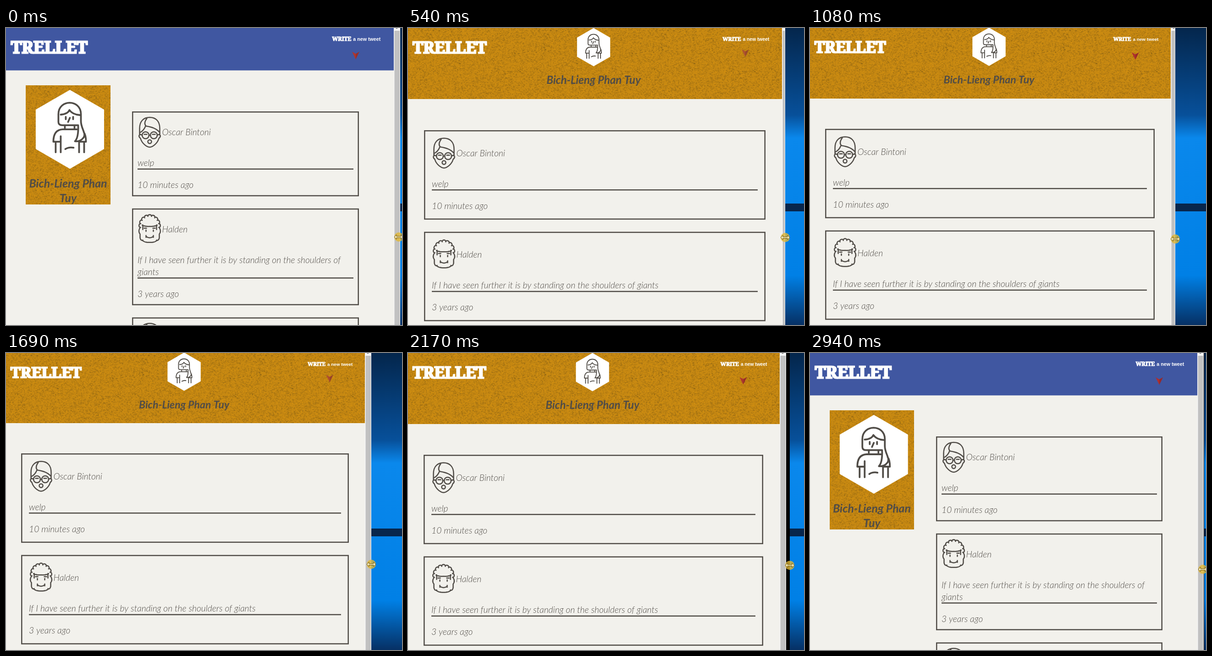
Animation, 864 px wide and 648 px high, one loop 3010 ms. Source, as an HTML page with a canvas:

```html
<!DOCTYPE html>
<html lang="en">
<head>
<meta charset="utf-8">
<title>Responsive feed</title>
<style>
  html, body { margin: 0; width: 100%; height: 100%; overflow: hidden; background: #f2f1ec; }
  canvas { display: block; }
</style>
</head>
<body>
<canvas id="stage" width="864" height="648"></canvas>
<script>
const LOOP = 3010;
const BREAKPOINT = 817;
const INK = '#504c47';
const PAPER = '#f2f1ec';
const BLUE = '#4057a1';
const TAU = Math.PI * 2;
const ctx = document.getElementById('stage').getContext('2d');

const clamp = p => Math.max(0, Math.min(1, p));
const smooth = p => p * p * (3 - 2 * p);

// The picture is refreshed in bursts, with a short rest after each
const TICKS = [0];
function burst(from, to, count) {
  for (let i = 0; i < count; i++) TICKS.push(Math.floor((from + (to - from) * i / (count - 1)) / 10) * 10);
}
burst(70, 540, 7);
burst(650, 1150, 8);
burst(1230, 1690, 7);
burst(1770, 2240, 7);
burst(2320, 2780, 7);
burst(2860, 2940, 2);

// The window is dragged narrower, rests, and is dragged back; the page lags behind the pointer
function pose(time) {
  const t = TICKS.filter(tick => tick <= time).pop();
  const shrink = clamp(t / 1150);
  const grow = smooth(clamp((t - 1710) / 970));
  const pull = 1 - (1 - clamp(t / 1080)) ** 1.3;
  const push = smooth(clamp((t - 1710) / 820));
  const w = Math.round(846 - 63 * shrink + 62 * grow);
  const desk = Math.round(860 + 63 * (push - pull));
  return {
    w, desk,
    edge: Math.min(desk, w + 14),
    pointerY: 456 + 5 * shrink ** 2 + 11 * grow ** 2,
    bounce: Math.cos(TAU * (t - 1070) / 374)
  };
}

function makeGold() {
  const size = 256, tile = document.createElement('canvas');
  tile.width = tile.height = size;
  const g = tile.getContext('2d');
  g.fillStyle = '#c68812';
  g.fillRect(0, 0, size, size);
  let seed = 7;
  const rnd = () => (seed = (seed * 16807) % 2147483647) / 2147483647;
  for (let i = 0; i < 15000; i++) {
    g.fillStyle = rnd() < 0.55 ? 'rgba(110,80,26,.25)' : 'rgba(224,156,20,.28)';
    g.fillRect(rnd() * size, rnd() * size, 1 + rnd() * 2, 1 + rnd());
  }
  return ctx.createPattern(tile, 'repeat');
}
const GOLD = makeGold();

function ring(path, x, y, r) {
  path.moveTo(x + r, y);
  path.arc(x, y, r, 0, TAU);
}

// A row of curls along an elliptic arc
function curls(path, x, y, rx, ry, from, to, count) {
  const at = (a, k) => [x + Math.cos(a) * rx * k, y + Math.sin(a) * ry * k];
  const step = (to - from) / count;
  path.moveTo(...at(from, 1));
  for (let i = 0; i < count; i++) {
    const a = from + step * i;
    path.bezierCurveTo(...at(a, 1.25), ...at(a + step, 1.25), ...at(a + step, 1));
  }
}

// Faces are 50 wide and symmetric: the left half is mirrored
function face(half) {
  const path = new Path2D(half);
  path.addPath(new Path2D(half), new DOMMatrix([-1, 0, 0, 1, 50, 0]));
  return path;
}

function glassesFace() {
  const path = face('M3 38 V25 C3 9 12 1 25 1 M4 38 Q-1 42 5 47 C8 58 19 66 25 66 M4 38 L9 40 M23 40 H25');
  path.addPath(new Path2D('M19 3 Q11 14 17 20 Q38 23 46 33 M16 20 Q12 30 4 34'));
  for (const x of [16, 34]) {
    ring(path, x, 40, 7.5);
    path.moveTo(x - 3, 38);
    path.lineTo(x + 3, 38);
  }
  ring(path, 25, 54, 4);
  return path;
}

function beardFace() {
  const path = face('M4 30 Q-1 38 4 44 V52 Q5 58 10 58 M10 34 V24 M13 31 H18 M17 35 V38 M17 47 V51 M17 49 Q21 52 25 52');
  curls(path, 25, 26, 20, 21, Math.PI * 0.95, Math.PI * 2.05, 9);
  curls(path, 25, 24, 15, 3, Math.PI, 0, 4);
  curls(path, 25, 57, 15, 5, Math.PI, 0, 3);
  return path;
}

const GLASSES = glassesFace();
const BEARD = beardFace();
const GIRL = new Path2D(
  'M-17 -9 Q-25 -9 -25 -16 V-33 C-25 -66 24 -66 24 -33 V-18 C24 0 38 10 28 20 Q22 27 11 26 Q19 18 18 -9 H-17' +
  'M-20 -32 Q-5 -33 -1 -42 Q6 -32 22 -31 M-9 -27 V-22 M7 -27 V-22 M0 -25 L-4 -16' +
  'M-11 -8 V0 M10 -8 V0 M15 0 H-16 Q-36 1 -36 27 H-22 M-20 15 V50 M-31 28 V50' +
  'M20 27 V50 M31 28 V50 M22 27 H35 Q35 12 30 6 M-10 43 Q-2 38 8 40');

function rect(x, y, w, h, fill) {
  ctx.fillStyle = fill;
  ctx.fillRect(x, y, w, h);
}

function icon(path, x, y, scale, width) {
  ctx.save();
  ctx.translate(x, y);
  ctx.scale(scale, scale);
  ctx.strokeStyle = INK;
  ctx.lineWidth = width;
  ctx.lineCap = ctx.lineJoin = 'round';
  ctx.stroke(path);
  ctx.restore();
}

function poly(points, fill) {
  ctx.beginPath();
  points.forEach(([x, y]) => ctx.lineTo(x, y));
  ctx.closePath();
  ctx.fillStyle = fill;
  ctx.fill();
}

function text(str, x, y, font, color = INK, align = 'left') {
  ctx.font = font;
  ctx.fillStyle = color;
  ctx.textAlign = align;
  ctx.fillText(str, x, y);
}

function slab(str, x, y, size, align) {
  text(str, x, y, `900 ${size}px "Noto Serif", serif`, '#fff', align);
  ctx.strokeStyle = '#fff';
  ctx.lineWidth = size * 0.08;
  ctx.lineJoin = 'miter';
  ctx.strokeText(str, x, y);
}

function gold(x, y, w, h) {
  ctx.save();
  ctx.translate(x, y);
  rect(0, 0, w, h, GOLD);
  ctx.restore();
}

function portrait(x, top, w) {
  const r = w * 0.5765, y = top + r;
  const corners = [0, 1, 2, 3, 4, 5].map(i => [x + Math.sin(i * TAU / 6) * r, y - Math.cos(i * TAU / 6) * r]);
  poly(corners, '#fff');
  icon(GIRL, x, y, w / 149, 3.8);
  return y + r;
}

const BODY = 'italic 300 19.3px Lato, "Open Sans", sans-serif';
const QUOTE = ['If I have seen further it is by standing on the shoulders of', 'giants'];
const nameFont = w => `italic 700 ${w * 0.0294}px Lato, "Open Sans", sans-serif`;

function post(box, path, name, lines, age) {
  const { x, y, right, pad, lift } = box;
  const extra = (lines.length - 1) * 26;
  const height = 185.2 + lift * 2.2 + extra;
  const left = x + pad, top = y + lift;
  ctx.strokeStyle = INK;
  ctx.lineWidth = 2.5;
  ctx.strokeRect(x + 1.25, y + 1.25, right - x - 2.5, height - 2.5);
  icon(path, left + 1.5, top + 12, 1, 2.5);
  text(name, left + 53.5, top + 52, BODY);
  lines.forEach((line, i) => text(line, left, top + 119 + i * 26, BODY));
  rect(left, top + 124.5 + extra, right - pad - left, 2.5, INK);
  text(age, left, top + 167 + extra, BODY);
  box.y = y + height + 26.5;
}

function feed(box, quote) {
  post(box, GLASSES, 'Oscar Bintoni', ['welp'], '10 minutes ago');
  post(box, BEARD, 'Halden', quote, '3 years ago');
  post(box, GLASSES, '', [''], '');
}

function widePage(w) {
  rect(0, 0, w, 92.5, BLUE);
  const x = Math.round(w * 0.0508), width = Math.round(w * 0.2181), mid = x + width / 2;
  const hexW = w * 0.1765, bottom = 135 + hexW * 1.153;
  gold(x, 125, width, Math.round(bottom + 78 - 125));
  portrait(w * 0.1648, 135, hexW);
  text('Bich-Lieng Phan', mid, bottom + 41, nameFont(w), INK, 'center');
  text('Tuy', mid, bottom + 73, nameFont(w), INK, 'center');
  feed({
    x: Math.round(w * 0.325), y: Math.round(182 + (w - 846) * 0.07),
    right: Math.round(w * 0.9099), pad: 12, lift: 0
  }, QUOTE);
}

function narrowPage(w) {
  const d = w - 816, mid = w * 0.4963;
  gold(0, 0, w, Math.round(155 + d * 0.05));
  portrait(mid, d * 0.03, 72.5);
  text('Bich-Lieng Phan Tuy', mid, 122 + d * 0.03, nameFont(w), INK, 'center');
  feed({
    x: Math.round(w * 0.0425), y: Math.round(222.6 + d * 0.1),
    right: Math.round(w * 0.9555), pad: 17, lift: 4.5
  }, [QUOTE.join(' ')]);
}

function header(w, bounce) {
  const size = w * 0.0427;
  slab('TRELLET', w * 0.0127, 42.5 + size * 0.357, size, 'left');
  const right = w * 0.966, label = 'a new tweet';
  text(label, right, 27.5, `bold ${w * 0.01264}px "Liberation Sans", Arial, sans-serif`, '#fff', 'right');
  slab('WRITE', right - ctx.measureText(label).width - 4, 27.5, w * 0.0142, 'right');

  const x = w * 0.9019, y = 57.5 + 3.5 * bounce;
  const tone = k => `rgb(${164 * k},${(62 - 18 * bounce) * k},${44 * k})`;
  for (const side of [-1, 1])
    poly([[x + side * 8, y - 8], [x, y - 3.5], [x, y + 8.5]], tone(1 - side * 0.07));
}

function desktop(x) {
  const g = ctx.createLinearGradient(0, 0, 0, 648);
  const add = (y, color) => g.addColorStop(y / 648, color);
  add(0, '#04264c');
  add(190, '#07509a');
  add(240, '#0a88ec');
  add(540, '#0080e6');
  add(648, '#063064');
  rect(x, 0, 864 - x, 648, g);
  rect(x, 383, 864 - x, 17, '#08264c');
}

function frame({ w, edge, desk }) {
  rect(edge, 0, 864 - edge, 648, '#000');
  desktop(desk);
  rect(w, 0, edge - w, 648, '#f6f6f6');
  rect(w + 1.5, 6, edge - w - 2.5, 642, '#c1c1c1');
  if (edge - w > 9) poly([[w + 4, 0], [w + 9, 0], [w + 6.5, 2]], '#777');
}

function pointer(x, y) {
  ctx.beginPath();
  ctx.arc(x, y, 10, 0, TAU);
  ctx.fillStyle = 'rgba(226,184,52,.8)';
  ctx.fill();
  const head = [[-5, 1.5], [-5, 5], [-10, 0], [-5, -5], [-5, -1.5]];
  const arrow = [...head, ...head.map(([dx, dy]) => [-dx, -dy])];
  poly(arrow.map(([dx, dy]) => [x + dx, y + dy]), '#f3e6b0');
  ctx.strokeStyle = '#6b5514';
  ctx.lineWidth = 1;
  ctx.stroke();
}

function draw(time) {
  const p = pose(time);
  rect(0, 0, 864, 648, PAPER);
  (p.w >= BREAKPOINT ? widePage : narrowPage)(p.w);
  header(p.w, p.bounce);
  frame(p);
  pointer(Math.min(p.desk, 857), p.pointerY);
}

const start = performance.now();
function loop() {
  draw((performance.now() - start) % LOOP);
  requestAnimationFrame(loop);
}
loop();
</script>
</body>
</html>
```
